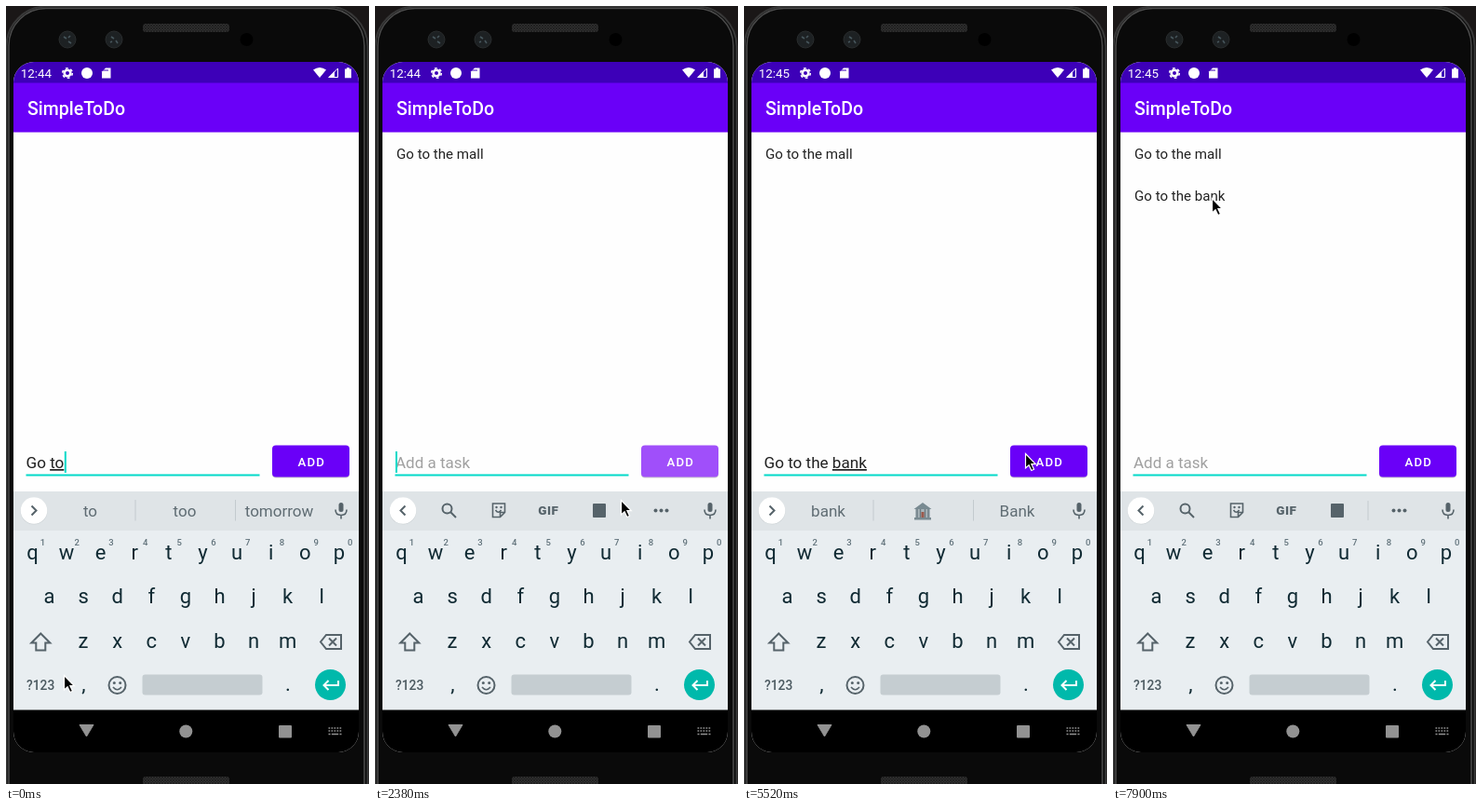
These frames come from a looping animation (390 px wide and 835 px high, 8 s). An HTML page:

```html
<!DOCTYPE html>
<html lang="en">
<head>
<meta charset="utf-8">
<title>To-do list demo</title>
<style>
html, body { margin: 0; width: 100%; height: 100%; overflow: hidden; background: #000 }
svg { display: block; width: 390px; height: 835px; font-family: Roboto, sans-serif }
text { white-space: pre }
.mid { text-anchor: middle }
.line { fill: none; stroke: #56636a; stroke-width: 2 }
.thin { stroke-width: 1.6 }
.key { font-size: 22px; fill: #102a33; text-anchor: middle }
.small { font-size: 9.5px; font-weight: 500; fill: #61727b; text-anchor: middle }
.word { font-size: 17px; fill: #5f6c73; text-anchor: middle }
.task { font-size: 15.1px; fill: #212121 }
.off { display: none }
#under { text-decoration: underline 1px }
</style>
</head>
<body>
<svg viewBox="0 0 390 835">
  <defs>
    <clipPath id="screen"><rect x="8" y="60" width="371" height="741" rx="22"/></clipPath>
    <pattern id="mesh" width="3" height="3" patternUnits="userSpaceOnUse">
      <rect width="3" height="3" fill="#303030"/><path d="M0 0L3 3M3 0L0 3" stroke="#1b1b1b" stroke-width=".7"/>
    </pattern>
  </defs>

  <!-- Phone body -->
  <rect width="390" height="835" fill="#1a1717"/>
  <rect x=".5" y=".5" width="388" height="890" rx="43" fill="#0a0a0a" stroke="#383838" stroke-width="2"/>
  <rect x="3" y="2.500" width="382" height="890" rx="40" fill="none" stroke="#4c4c4c" stroke-width="1.500"/>
  <rect x="147" y="19" width="93" height="9" rx="3" fill="url(#mesh)"/>
  <rect x="147" y="827" width="93" height="12" rx="3" fill="url(#mesh)"/>
  <g fill="#1d2123" stroke="#2a2d2e">
    <circle cx="66" cy="36" r="9"/><circle cx="116" cy="36" r="9"/>
  </g>
  <path d="M62 33l3 2m2 3l3 2M69 32l-2 2M113 33l3 2m2 2l2 3M112 39l2-1" stroke="#46555b" stroke-width="1.600"/>
  <circle cx="258.500" cy="36" r="7" fill="#000"/>

  <g clip-path="url(#screen)">
    <rect x="8" y="60" width="371" height="741" fill="#fefefe"/>
    <rect x="8" y="60" width="371" height="24" fill="#3d00b8"/>
    <rect x="8" y="82.500" width="371" height="53" fill="#6a00f8"/>

    <!-- Status bar -->
    <g fill="#fff">
      <text id="clock" x="15.800" y="76.500" font-size="13.400"></text>
      <circle cx="66" cy="72" r="3.300" fill="none" stroke="#fff" stroke-width="2.600"/>
      <circle cx="66" cy="72" r="5.300" fill="none" stroke="#fff" stroke-width="1.600" stroke-dasharray="2.775"/>
      <circle cx="87" cy="72" r="6"/>
      <path d="M107 66.500h5.500v11h-9.500v-7z"/>
      <path d="M330 68.500q7-5 14 0l-7 8.500z"/>
      <path d="M347 76.500l9.500-9.500v9.500z" fill="none" stroke="#fff"/>
      <path d="M346 77l7-7v7z"/>
      <path d="M364 67.500h2v-1.300h3v1.300h2v9.800h-7z"/>
    </g>
    <path d="M105 68v2m2-2v2m2-2v2" stroke="#3d00b8"/>
    <text x="23" y="116.500" font-size="19.500" font-weight="500" fill="#fff">SimpleToDo</text>

    <text class="task" id="task1" x="23" y="164">Go to the mall</text>
    <text class="task" id="task2" x="23" y="209">Go to the bank</text>

    <!-- Entry field and button -->
    <text id="hint" x="22" y="496" font-size="17" fill="#a0a0a0">Add a task</text>
    <text x="21.500" y="496" font-size="17.100" fill="#212121"><tspan id="plain"></tspan><tspan id="under"></tspan></text>
    <rect x="21.500" y="502.500" width="251" height="2" fill="#03dac9"/>
    <rect id="caret" y="478" width="2" height="23" fill="#03dac9"/>
    <rect x="286" y="472.500" width="83" height="34" rx="4" fill="#000" opacity=".2"/>
    <rect id="button" x="286" y="471.500" width="83" height="34" rx="4"/>
    <text x="313.500" y="493.500" font-size="13.200" font-weight="500" letter-spacing="1.200" fill="#fff">ADD</text>

    <!-- Keyboard -->
    <rect x="8" y="521" width="371" height="235" fill="#e9eef1"/>
    <rect x="8" y="521" width="371" height="42" fill="#dfe4e7"/>
    <circle cx="30" cy="542" r="14.500" fill="#cdd3d6"/>
    <circle cx="30" cy="541.500" r="14.300" fill="#fff"/>
    <path id="chevron" class="line"/>
    <rect x="357.500" y="533" width="5" height="10" rx="2.500" fill="#56636a"/>
    <path class="line thin" d="M354 540.500q0 6 6 6t6-6M360 546.500v4"/>
    <g id="words">
      <path d="M139 530v22.500M246.500 530v22.500" stroke="#c3cace"/>
      <text class="word" x="90.500" y="548"></text>
      <text class="word" x="192" y="548"></text>
      <text class="word" x="293.500" y="548"></text>
      <g id="bank">
        <path d="M182.500 540l9.500-7 9.500 7zM183 549h18v2.500h-18z" fill="#788a91"/>
        <path d="M184 540h16v9h-16z" fill="#a9b5ba"/>
        <path d="M186 540v9m3.500-9v9m5-9v9m3.500-9v9" stroke="#6c7c83" stroke-width="1.500"/>
        <path d="M190.500 543h3v6h-3z" fill="#9b5a4c"/>
      </g>
    </g>
    <g id="tools" fill="#56636a">
      <circle class="line" cx="77.500" cy="539.500" r="5"/><path class="line" d="M81 543l6 6"/>
      <path class="line thin" d="M126.500 534h13v9.500l-5 5h-8zM139 543.500h-4.500v5M129.500 541q3 4.500 6 0"/>
      <circle cx="130.500" cy="538" r="1.200"/><circle cx="135.500" cy="538" r="1.200"/>
      <text class="mid" x="186.300" y="546" font-size="13.500" font-weight="900" letter-spacing=".400">GIF</text>
      <rect x="234" y="534" width="14" height="15" rx="1"/>
      <path id="split" d="M274 531v21" stroke="#c3cace"/>
      <circle cx="301.500" cy="541.500" r="2"/><circle cx="307.500" cy="541.500" r="2"/><circle cx="313.500" cy="541.500" r="2"/>
    </g>
    <g id="keys"></g>
    <path class="line" d="M37.300 673.500l10 10h-5v8h-10v-8h-5z"/>
    <path class="line" d="M344 675h16v15h-16l-6-7.500zM347 678.500l8 8m0-8l-8 8"/>
    <text x="22" y="734" font-size="13.800" font-weight="500" fill="#4b5960">?123</text>
    <circle class="line" cx="119.500" cy="729" r="9"/>
    <path class="line thin" d="M115 731q4.500 5.500 9 0"/>
    <circle cx="116.300" cy="726.500" r="1.500" fill="#56636a"/><circle cx="122.700" cy="726.500" r="1.500" fill="#56636a"/>
    <rect x="146.500" y="717.500" width="129" height="22" rx="3" fill="#c5cdd1"/>
    <circle cx="348.500" cy="728.500" r="16.500" fill="#00b9ab"/>
    <path d="M357 724v5h-15.500m5-5l-5 5 5 5" fill="none" stroke="#fff" stroke-width="2"/>

    <!-- Navigation bar -->
    <rect x="8" y="755.500" width="371" height="46" fill="#000"/>
    <g fill="#929292">
      <path d="M79 771.500h15l-7.500 12.500z" stroke="#929292" stroke-linejoin="round"/>
      <circle cx="193.300" cy="778.500" r="7"/><rect x="293" y="772" width="14" height="13.500" rx="1"/>
    </g>
    <path d="M346.500 775h14m-14 3h14" stroke="#929292" stroke-width="1.700" stroke-dasharray="1.700 1.300"/>
    <path d="M346.500 781.500h2m1.300 0h7.400m1.300 0h2" stroke="#929292" stroke-width="1.700"/>
  </g>

  <path id="mouse" d="M.500.500V16l3.600-3.300 2.700 5.800 2.700-1.200-2.600-5.600h4.400z" fill="#000" stroke="#fff" stroke-width="1.200"/>
</svg>

<script>
const LOOP = 8000;
const $ = id => document.getElementById(id);
const show = (id, on) => $(id).classList.toggle('off', !on);

// Each row: start time, typed text, suggestions (bold ones carry a leading *).
const typing = [
  [0, 'Go to', 'to,too,tomorrow'],
  [150, 'Go to ', 'the,bed,get'],
  [300, 'Go to t', 'the,to,this'],
  [450, 'Go to th', 'th,*the,this'],
  [600, 'Go to the', 'the,them,these'],
  [750, 'Go to the ', 'store,gym,bank'],
  [900, 'Go to the m', 'm,my,movies'],
  [1050, 'Go to the ma', 'ma,*mall,market'],
  [1200, 'Go to the mall', 'mall,malls,Mall'],
  [2380, '', ''],
  [3280, 'G', 'G,Good,Go'],
  [3430, 'Go', 'Go,Good,Going'],
  [3580, 'Go ', 'grocery,to,ahead'],
  [3730, 'Go t', 't,*to,the'],
  [3880, 'Go to', 'to,too,tomorrow'],
  [4030, 'Go to t', 'the,to,this'],
  [4180, 'Go to the', 'the,them,these'],
  [4330, 'Go to the ', 'store,gym,bank'],
  [4480, 'Go to the b', 'b,bank,beach'],
  [4630, 'Go to the ba', 'ba,*bank,bathroom'],
  [4780, 'Go to the bank', 'bank,,Bank'],
  [5970, '', '']
];

// Pointer rows: start time, x, y.
const pointer = [
  [0, 62, 718], [1490, 128, 655], [1640, 255, 537], [1790, 311, 487],
  [2380, 264, 530], [2530, 205, 594], [2680, 166, 562], [2830, 154, 538],
  [5080, 192, 522], [5230, 250, 498], [5370, 292, 483], [5520, 302, 480]
];
const lastMove = [6860, 7010, 7160, 7300, 7450, 7600, 7750, 7900];
lastMove.forEach((time, i) => {
  const p = (i + 1) / lastMove.length, ease = p * p * (3 - 2 * p);
  pointer.push([time, 302 - 196 * ease, 480 - 274 * ease]);
});

const caretHidden = [[1790, 2240], [2830, 3280], [5370, 5820], [6560, 7010], [7600, LOOP]];
const buttonColors = [
  [0, '#6a00f8'], [2240, '#8b35f9'], [2380, '#a04ffa'], [2530, '#8128f9'], [2680, '#6a00f8'],
  [5820, '#8b35f9'], [5970, '#a04ffa'], [6110, '#8128f9'], [6260, '#6a00f8']
];

const rowAt = (rows, t) => rows.findLast(row => row[0] <= t);

function buildKeys() {
  const label = (cls, x, y, s) => `<text class="${cls}" x="${x}" y="${y}">${s}</text>`;
  const row = (letters, x, y) => [...letters].map((s, i) => label('key', x + i * 36.6, y, s)).join('');
  $('keys').innerHTML = row('qwertyuiop', 28.5, 594) + row('asdfghjkl', 46.5, 641) +
    row('zxcvbnm', 83, 689) + label('key', 83.5, 735, ',') + label('key', 303, 735, '.') +
    [...'1234567890'].map((s, i) => label('small', 39.5 + i * 36.7, 579, s)).join('');
}

let shown;
function setText(row) {
  if (row === shown) return;
  shown = row;
  const [, text, suggestions] = row;
  const start = text.lastIndexOf(' ') + 1;
  $('plain').textContent = text.slice(0, start);
  $('under').textContent = text.slice(start);
  const width = text ? $('plain').parentNode.getComputedTextLength() : 0;
  $('caret').setAttribute('x', 22 + width);

  show('hint', !text);
  show('words', text);
  show('tools', !text);
  $('chevron').setAttribute('d', text ? 'M27.500 536.500l5 5-5 5' : 'M32.500 536.500l-5 5 5 5');
  const words = suggestions.split(',');
  document.querySelectorAll('.word').forEach((el, i) => {
    const word = words[i] || '', bold = word[0] === '*';
    el.textContent = word.replace('*', '');
    el.style.fontWeight = bold ? 700 : 400;
    el.style.fill = bold ? '#000' : '';
  });
  show('bank', words[1] === '' && text);
}

function draw() {
  const t = performance.now() % LOOP;
  const [, x, y] = rowAt(pointer, t);
  setText(rowAt(typing, t));
  $('mouse').setAttribute('transform', `translate(${x} ${y})`);
  $('button').setAttribute('fill', rowAt(buttonColors, t)[1]);
  $('clock').textContent = t < 4630 ? '12:44' : '12:45';
  show('caret', !caretHidden.some(([from, to]) => t >= from && t < to));
  show('task1', t >= 2380);
  show('task2', t >= 5970);
  show('split', t >= 2530 && t < 5970 || t >= 6110);
  requestAnimationFrame(draw);
}

buildKeys();
draw();
</script>
</body>
</html>
```
